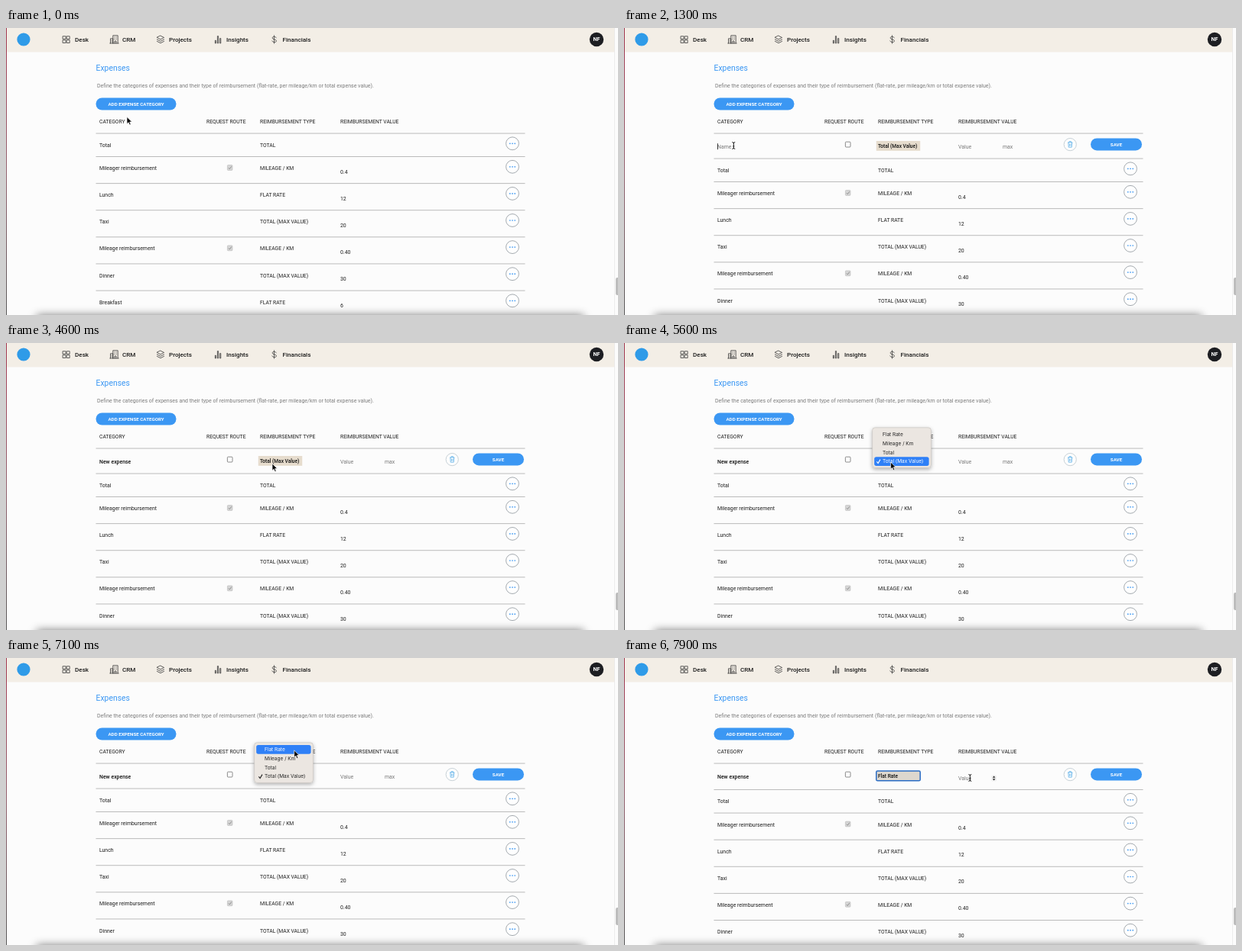
An HTML page that plays this animation: 800x376 px, repeating every 8 s.

```html
<!DOCTYPE html>
<html lang="en">
<head>
<meta charset="utf-8">
<title>Expense categories</title>
<style>
html, body { margin: 0; width: 100%; height: 100%; overflow: hidden; background: #fcfcfc; }
svg { display: block; width: 800px; height: 376px; }
text { font: 400 6.9px Roboto, "Open Sans", sans-serif; fill: #1c1c1c; white-space: pre; }
.nav { font-size: 8.1px; font-weight: 500; }
.caps { font-size: 6.75px; }
.title { font-size: 10.4px; fill: #3b97f3; }
.note { font-size: 7.03px; fill: #7b7b7b; }
.btn { font-size: 6.2px; font-weight: 700; fill: #fff; text-anchor: middle; }
.hint { fill: #777; }
.strong { font-weight: 500; fill: #111; }
.pick { font-size: 6.55px; font-weight: 500; fill: #111; }
.item { font: 400 6.5px Inter, Roboto, sans-serif; }
.icon { fill: none; stroke: #3a3a3a; stroke-width: .8; stroke-linejoin: round; stroke-linecap: round; }
</style>
</head>
<body>
<svg id="stage" viewBox="0 0 800 376">
  <defs>
    <linearGradient id="edge" x1="0" y1="0" x2="0" y2="1">
      <stop offset="0" stop-color="#a2364f"/>
      <stop offset=".5" stop-color="#8f5f6c"/>
      <stop offset="1" stop-color="#555"/>
    </linearGradient>
    <filter id="soft" x="-20%" y="-200%" width="140%" height="500%"><feGaussianBlur stdDeviation="6"/></filter>
    <filter id="drop" x="-20%" y="-20%" width="140%" height="150%">
      <feDropShadow dx="0" dy="2" stdDeviation="2.5" flood-opacity=".3"/>
    </filter>
  </defs>
</svg>
<script>
const LOOP = 8000, STEP = 100;
const BLUE = '#3b97f3';
const stage = document.getElementById('stage');

function add(parent, tag, attrs = {}, text) {
  const node = document.createElementNS('http://www.w3.org/2000/svg', tag);
  for (const key in attrs) node.setAttribute(key, attrs[key]);
  if (text !== undefined) node.textContent = text;
  parent.appendChild(node);
  return node;
}
const group = (parent = stage) => add(parent, 'g');
const label = (parent, text, x, y, cls = '') => add(parent, 'text', { x, y, class: cls }, text);
const rect = (parent, x, y, width, height, fill, more = {}) =>
  add(parent, 'rect', { x, y, width, height, fill, ...more });
const path = (parent, d, more = {}) => add(parent, 'path', { d, ...more });
const icon = d => path(stage, d, { class: 'icon' });
const show = (node, on) => node.setAttribute('visibility', on ? 'visible' : 'hidden');
const move = (node, x, y) => node.setAttribute('transform', `translate(${x} ${y})`);
const rule = (parent, y) => rect(parent, 117.5, y - .4, 561, .9, '#b4b4b4');

function button(parent, x, y, w, text) {
  rect(parent, x, y, w, 16, BLUE, { rx: 8 });
  label(parent, text, x + w / 2, y + 10.2, 'btn');
}

// Page chrome
rect(stage, 0, 0, 800, 376, '#fcfcfc');
rect(stage, 0, 0, 795.5, 31.5, '#f3eee6');
rect(stage, 795.3, 0, .7, 376, '#e6e6e6');
rect(stage, 797, 327, 5, 23, '#bdbdbd', { rx: 2 });
add(stage, 'circle', { cx: 23, cy: 15, r: 8.6, fill: '#2f9be8' });

icon('M74.5 10.8h3.6v3.6h-3.6zM79.6 10.8h3.6v3.6h-3.6zM74.5 15.9h3.6v3.6h-3.6zM79.6 15.9h3.6v3.6h-3.6z');
icon('M135.8 20h11.4M136.6 20v-6.2h3.2V20M139.8 20V9.8h6.4V20M141.7 12h.4M144 12h.4M141.7 14.4h.4M144 14.4h.4M142 20v-3h2v3M138 16h.3M138 18h.3');
icon('M202 10.2l4.6 2.3-4.6 2.4-4.6-2.4zM197.4 15l4.6 2.4 4.6-2.4M197.4 17.4l4.6 2.4 4.6-2.4');
icon('M273.3 19.6v-3.3h1.2v3.3zM276.4 19.6v-9h1.2v9zM279.6 19.6v-6h1.2v6z');
icon('M350.5 9.8v10.4M353.2 12.8c-.5-2-5-2-5.1.2c0 2.6 5.3 1.2 5.3 4c0 2.3-5 2.2-5.6-.1');
[['Desk', 90], ['CRM', 152], ['Projects', 213], ['Insights', 288], ['Financials', 361.5]]
  .forEach(([text, x]) => label(stage, text, x, 17.6, 'nav'));

add(stage, 'circle', { cx: 772, cy: 15, r: 9.2, fill: '#1d1e22' });
label(stage, 'NF', 772, 17.4, 'btn').style.fontSize = '7.2px';

label(stage, 'Expenses', 117.5, 55.8, 'title');
label(stage, 'Define the categories of expenses and their type of reimbursement (flat-rate, per mileage/km or total expense value).', 119, 77.5, 'note');
button(stage, 117.5, 91.5, 105, 'ADD EXPENSE CATEGORY');
[['CATEGORY', 122], ['REQUEST ROUTE', 262], ['REIMBURSEMENT TYPE', 332], ['REIMBURSEMENT VALUE', 437]]
  .forEach(([text, x]) => label(stage, text, x, 124.9, 'caps'));
rule(stage, 138);

// Existing categories
const list = group();
[
  ['Total', 'TOTAL'],
  ['Mileager reimbursement', 'MILEAGE / KM', '0.4'],
  ['Lunch', 'FLAT RATE', '12'],
  ['Taxi', 'TOTAL (MAX VALUE)', '20'],
  ['Mileage reimbursement', 'MILEAGE / KM', '0.40'],
  ['Dinner', 'TOTAL (MAX VALUE)', '30'],
  ['Breakfast', 'FLAT RATE', '6']
].forEach(([name, type, value], i) => {
  const top = i ? 168.5 + (i - 1) * 35.1 : 138;
  if (i) rule(list, top);
  label(list, name, 122, top + 17.6);
  label(list, type, 332, top + 17.6, 'caps');
  if (value) label(list, value, 437, top + 22.1);
  if (type.startsWith('MILEAGE')) {
    rect(list, 289.4, top + 11.1, 6.6, 6.8, '#d6d6d6', { rx: 1, stroke: '#b9b9b9', 'stroke-width': .6 });
    path(list, `M290.9 ${top + 14.7}l1.4 1.5 2.4-3.4`, { fill: 'none', stroke: '#888', 'stroke-width': .9 });
  }
  const cy = top + 13.3;
  add(list, 'circle', { cx: 662, cy, r: 8.4, fill: '#fefefe', stroke: '#8f969c', 'stroke-width': .8 });
  [-3.2, 0, 3.2].forEach(d => add(list, 'circle', { cx: 662 + d, cy, r: .85, fill: BLUE }));
});

// Row being edited
const row = group();
const lowRule = rule(row, 171);
const nameText = label(row, '', 122, 157.9);
const caret = rect(row, 0, 151.2, .8, 8, '#111');
rect(row, 289.4, 149.2, 6.6, 6.8, '#fff', { rx: 1, stroke: '#6f6f6f', 'stroke-width': .8 });
const field = rect(row, 329.8, 148, 57.4, 12.8, '#e6dccd');
const typeText = label(row, '', 332, 156.7, 'pick');
const valueText = label(row, 'Value', 437, 157.9, 'hint');
const maxText = label(row, 'max', 495, 157.9, 'hint');
const spinner = group(row);
rect(spinner, 480.3, 153.4, 6.6, 8.2, '#efefef', { rx: 1.6 });
path(spinner, 'M481.8 156.8l1.8-2.2 1.8 2.2zM481.8 158.3l1.8 2.2 1.8-2.2z', { fill: '#222' });
add(row, 'circle', { cx: 583.2, cy: 152.6, r: 8.1, fill: '#fefefe', stroke: '#b9c6cc', 'stroke-width': .8 });
path(row, 'M580 150h6.4M582 150v-1.3h2.4v1.3M580.8 150l.4 6.2h4l.4-6.2M582.4 151.8v2.8M584 151.8v2.8',
  { fill: 'none', stroke: '#45a5e6', 'stroke-width': .7 });
button(row, 610, 144.4, 67, 'SAVE');

// Type menu
const ITEM_TOP = 113.9, ITEM_H = 11.75;
const menu = group();
rect(menu, 324.6, 110.8, 76.8, 52.6, '#ebe6e1', { rx: 3.6, stroke: '#b9b5b1', 'stroke-width': .5, filter: 'url(#drop)' });
const bar = rect(menu, 327.2, 0, 71.4, 11.75, '#2f80f7', { rx: 2.6 });
const items = ['Flat Rate', 'Mileage / Km', 'Total', 'Total (Max Value)']
  .map((text, i) => label(menu, text, 338, ITEM_TOP + i * ITEM_H + 8.2, 'item'));
const tick = path(menu, 'M330.4 155.4l1.7 2.2 2.9-5', { fill: 'none', 'stroke-width': 1.1 });

// Edges over the content
rect(stage, 0, 0, 1, 376, 'url(#edge)');
rect(stage, 40, 376, 715, 14, '#000', { opacity: .5, filter: 'url(#soft)' });

// Pointers, each with its hot spot at 0,0
const arrow = path(stage, 'M0 0v9.2l2.1-2 1.5 3.4 1.6-.7-1.5-3.3h2.9z',
  { fill: '#000', stroke: '#fff', 'stroke-width': .7, 'stroke-linejoin': 'round' });
const beam = group();
const beamShape = 'M-1.9-4.4q1.9 0 1.9 1.4q0-1.4 1.9-1.4M0-3v6M-1.9 4.4q1.9 0 1.9-1.4q0 1.4 1.9 1.4M-1 .9h2';
path(beam, beamShape, { fill: 'none', stroke: '#fff', 'stroke-width': 1.9 });
path(beam, beamShape, { fill: 'none', stroke: '#000', 'stroke-width': .9 });

const ROW_AT = 600, TYPE_AT = 1900, KEY = 190, OPEN_AT = 5000, PICK_AT = 7200, APPLY_AT = 7500;
const ENTRY = 'New expense';
const TYPED_AT = TYPE_AT + KEY * (ENTRY.length - 1);

// time, x, y
const TRACK = [
  [0, 158, 116.5], [100, 158, 116.5], [400, 163, 101], [700, 163, 101], [1200, 143.3, 154],
  [4000, 143.3, 154], [4500, 348, 158], [5500, 348, 158], [5900, 352, 146], [6400, 359.3, 131.6],
  [6900, 370, 121], [7200, 379, 121], [7400, 400, 126], [7800, 452.3, 157], [8000, 452.3, 157]
];

function pointerAt(t) {
  const i = TRACK.findIndex(p => p[0] > t);
  const [t0, x0, y0] = TRACK[i - 1], [t1, x1, y1] = TRACK[i];
  const u = (t - t0) / (t1 - t0), k = u * u * (3 - 2 * u);
  return [x0 + (x1 - x0) * k, y0 + (y1 - y0) * k];
}

function drawName(t) {
  const count = t < TYPE_AT ? 0 : Math.min(ENTRY.length, Math.floor((t - TYPE_AT) / KEY) + 1);
  nameText.textContent = count ? ENTRY.slice(0, count) : 'Name';
  nameText.setAttribute('class', count ? 'strong' : 'hint');
  caret.setAttribute('x', 122 + (count ? nameText.getComputedTextLength() + .3 : .2));
  const typing = t >= TYPE_AT && t < TYPED_AT;
  const blink = (t - (t < TYPE_AT ? 1200 : TYPED_AT)) % 1000 < 500;
  show(caret, t >= 1200 && t < 4600 && (typing || blink));
}

function drawMenu(t, y) {
  const fade = t <= PICK_AT ? 1 : t <= 7300 ? .5 : t <= 7400 ? .04 : 0;
  show(menu, t >= OPEN_AT && fade > 0);
  menu.setAttribute('opacity', fade);
  const hover = t >= PICK_AT ? 0 : Math.max(0, Math.min(3, Math.floor((y - ITEM_TOP) / ITEM_H)));
  bar.setAttribute('y', ITEM_TOP + hover * ITEM_H);
  items.forEach((item, i) => item.style.fill = i === hover ? '#fff' : '#222');
  tick.setAttribute('stroke', hover === 3 ? '#fff' : '#222');
}

function drawRow(t) {
  const open = t >= ROW_AT, flat = t >= APPLY_AT, focus = t > PICK_AT;
  show(row, open);
  row.setAttribute('display', open ? 'inline' : 'none');
  move(list, 0, !open ? 0 : flat ? 34.5 : 33);
  move(lowRule, 0, flat ? 1.5 : 0);
  typeText.textContent = flat ? 'Flat Rate' : 'Total (Max Value)';
  field.setAttribute('fill', focus ? '#ddd7ce' : '#e6dccd');
  field.setAttribute('stroke', focus ? '#2a6cc4' : 'none');
  field.setAttribute('stroke-width', 1.5);
  field.setAttribute('rx', focus ? 1.6 : 0);
  valueText.setAttribute('y', flat ? 160 : 157.9);
  maxText.setAttribute('display', flat ? 'none' : 'inline');
  spinner.setAttribute('display', flat ? 'inline' : 'none');
}

function draw(t) {
  const [x, y] = pointerAt(t);
  drawRow(t);
  drawName(t);
  drawMenu(t, y);
  const hidden = t >= TYPE_AT && t < 4000;
  const overText = (t >= 1100 && t < 4200) || t >= 7700;
  show(arrow, !hidden && !overText);
  show(beam, !hidden && overText);
  move(arrow, x, y);
  move(beam, x, y);
}

const start = performance.now();
function tick60() {
  const t = (performance.now() - start) % LOOP;
  draw(Math.floor(t / STEP) * STEP);
  requestAnimationFrame(tick60);
}
tick60();
</script>
</body>
</html>
```
